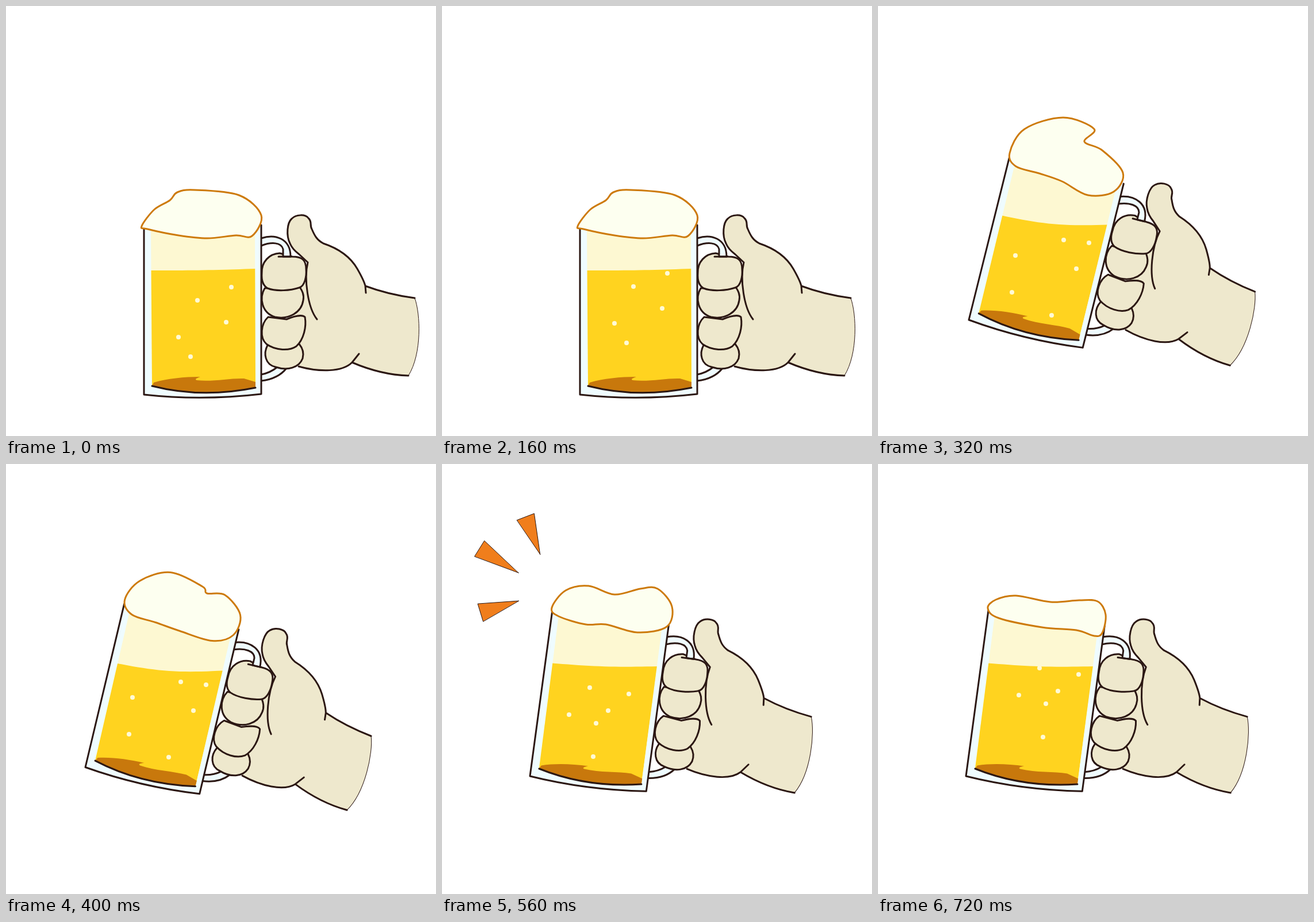
Animation, 748 px wide and 748 px high, one loop 800 ms. Source, as an HTML page with a canvas:

```html
<!DOCTYPE html>
<html lang="en">
<head>
<meta charset="utf-8">
<title>Cheers</title>
<style>
html, body { margin: 0; width: 100%; height: 100%; overflow: hidden; background: #fff; }
canvas { display: block; }
</style>
</head>
<body>
<canvas id="stage" width="748" height="748"></canvas>
<script>
const ctx = document.getElementById('stage').getContext('2d');
const STEP = 80;
const INK = '#2b1713', SKIN = '#eee8cd', GLASS = '#effcff', CREAM = '#fdf8d2', BEER = '#ffd31f',
      DREGS = '#c8780c', BUBBLE = '#fffad6', FOAM = '#fdfff0', RIM = '#cd7a0b', SPARK = '#f07e1c';

// Rigid parts, drawn in the resting pose.
const P = d => new Path2D(d);
const thumb = 'M525 446 L510 432 Q498 423 494 413 C487 399 489 377 497 370 C505 362 521 362 526 369 C533 375 528 382 532 388 C537 400 541 407 552 413 C582 423 600 438 611 457 Q623 478 625 487';
const wrist = 'Q665 502 711 508';
const cuff = 'C721 535 724 605 700 643';
const palm = 'C665 642 630 632 602 620 C585 637 545 637 509 627';
const hand = P(`${thumb} ${wrist} ${cuff} ${palm} L495 560 L508 470 Z`);
const handLines = P(`${thumb} L626 499 M625 487 ${wrist} M700 643 ${palm} M614 605 L602 620 M525 446 C518 475 525 525 541 545`);
const cuffLine = P('M711 508 ' + cuff);
const fingers = [
  'M455 590 C447 605 451 624 469 628 C490 635 510 629 516 613 C519 602 515 594 510 588 Z',
  'M456 541 C443 553 441 577 453 588 C470 600 493 600 505 592 C518 580 523 558 520 541 C515 536 500 540 488 545 Z',
  'M450 491 C440 508 445 534 468 541 C492 546 514 533 517 512 C519 502 515 495 511 489 Z',
  'M476 430 C458 431 444 445 445 465 C444 480 448 487 455 491 C470 497 495 495 510 490 C520 487 523 470 522 458 C522 442 515 436 498 436 Z'
].map(P);
const gripTop = P('M444 404 C468 396 495 404 495 436 L482 436 L482 423 C479 411 462 410 444 417');
const gripEnd = P('M474 436 L496 436');
const gripLow = P('M444 641 Q460 638 472 628 L488 630 C477 644 462 650 444 652');
const glass = P('M240 384 L240 676 Q340 687 444 675 L444 381');
const inside = P('M252 386 L433 386 L434 664 Q340 683 254 661 Z');
const dregs = P('M254 661 L257 655 C280 648 310 645 338 645 Q326 649 332 651 C360 654 390 647 414 648 L434 654 L434 664 Q340 683 254 661 Z');
const insideBase = P('M254 661 Q340 683 434 664');

// at: lower left corner of the glass and its turn in degrees.
// beer: surface height at the left wall and its dip in the middle.
// foam: key points of a smooth outline.
const pairs = s => s.split(' ').map(p => p.split(',').map(Number));
const pose = (at, beer, foam) => ({ at, beer, foam: pairs(foam) });
const mix = (a, b) => Array.isArray(a) ? a.map((v, i) => mix(v, b[i])) : (a + b) / 2;
const between = (a, b) => ({ at: mix(a.at, b.at), beer: mix(a.beer, b.beer), foam: mix(a.foam, b.foam) });

const rest = pose([240, 676, 0], [460, 1],
  '236,383 258,354 285,338 298,324 328,320 405,329 444,364 428,400 400,399 350,404 300,399 246,388');
const lift = pose([221, 653, 1.5], [467, 9],
  '227,352 259,320 272,308 300,306 344,320 397,308 424,323 431,365 414,383 386,378 300,381 243,373');
const swing = pose([158, 546, 14], [486, 7],
  '229,256 255,214 322,194 376,214 359,236 390,251 426,290 410,323 365,329 320,305 280,291 240,279');
const clink = pose([118, 509, 12.8], [489, 7],
  '184,217 210,193 250,183 307,212 340,214 372,205 389,235 381,272 352,286 285,276 240,260 198,245');
const back = pose([153, 543, 7.7], [476, 3],
  '191,250 215,220 255,212 300,227 345,217 375,217 400,248 391,283 340,293 285,279 250,279 203,265');
const still = pose([153, 543, 7.7], [476, 3],
  '191,251 205,236 240,229 300,240 350,237 382,239 396,262 390,294 376,299 345,289 285,284 210,268');
const steps = [rest, rest, rest, lift, swing, between(swing, clink), clink, back, between(back, still), still];

// Bubbles appear in three bursts, each drifting steadily from its first step.
const fizz = [
  { from: 0, drift: [0, -12], spots: pairs('392,489 333,512 383,550 300,576 321,610') },
  { from: 4, drift: [-19, -28], spots: pairs('323,407 239,434 345,457 233,498 302,538 367,412') },
  { from: 7, drift: [12, -17], spots: pairs('257,389 325,400 221,436 289,429 268,451 263,509') }
];

// Sparks shoot out along fixed rays: origin, angle, reach.
const rays = [[177, 174, -111, 88], [150, 200, -148, 100], [150, 233, 163, 87]];
const sparkSpan = { 6: [0, 0.28], 7: [0.2, 1], 8: [0.6, 1.24] };

function smooth(pts) {
  const path = new Path2D(), n = pts.length;
  path.moveTo(...pts[0]);
  pts.forEach((b, i) => {
    const a = pts[(i + n - 1) % n], c = pts[(i + 1) % n], d = pts[(i + 2) % n];
    path.bezierCurveTo(b[0] + (c[0] - a[0]) / 6, b[1] + (c[1] - a[1]) / 6,
                       c[0] - (d[0] - b[0]) / 6, c[1] - (d[1] - b[1]) / 6, c[0], c[1]);
  });
  path.closePath();
  return path;
}

function fill(path, color) {
  ctx.fillStyle = color;
  ctx.fill(path);
}

function line(path, color = INK, width = 3) {
  ctx.strokeStyle = color;
  ctx.lineWidth = width;
  ctx.stroke(path);
}

function drawBeer([left, dip]) {
  const path = new Path2D();
  path.moveTo(252, 690);
  for (let u = 0; u <= 1.001; u += 0.05) {
    path.lineTo(252 + 182 * u, left + (457 - left) * u + dip * Math.sin(Math.PI * u));
  }
  path.lineTo(434, 690);
  ctx.save();
  ctx.clip(inside);
  fill(path, BEER);
  ctx.restore();
}

function drawMug({ at: [x, y, deg], beer }) {
  ctx.save();
  ctx.translate(x, y);
  ctx.rotate(deg * Math.PI / 180);
  ctx.translate(-240, -676);
  fill(gripLow, GLASS);
  line(gripLow);
  fill(hand, SKIN);
  line(handLines);
  line(cuffLine, INK, 1);
  for (const f of fingers) {
    fill(f, SKIN);
    line(f);
  }
  fill(gripTop, GLASS);
  line(gripTop);
  line(gripEnd);
  fill(glass, GLASS);
  fill(inside, CREAM);
  drawBeer(beer);
  fill(dregs, DREGS);
  line(insideBase);
  line(glass);
  ctx.restore();
}

function drawBubbles(i) {
  const { from, drift, spots } = fizz.findLast(f => f.from <= i);
  for (const [x, y] of spots) {
    const dot = new Path2D();
    dot.arc(x + drift[0] * (i - from), y + drift[1] * (i - from), 4, 0, Math.PI * 2);
    fill(dot, BUBBLE);
  }
}

function drawSparks([inner, outer]) {
  for (const [x, y, deg, reach] of rays) {
    const c = Math.cos(deg * Math.PI / 180), s = Math.sin(deg * Math.PI / 180);
    const tri = new Path2D();
    for (const [r, side] of [[inner, 0], [outer, 16], [outer, -16]]) {
      tri.lineTo(x + c * r * reach - s * side, y + s * r * reach + c * side);
    }
    tri.closePath();
    fill(tri, SPARK);
    line(tri, INK, 1);
  }
}

function draw(i) {
  ctx.fillStyle = '#fff';
  ctx.fillRect(0, 0, 748, 748);
  ctx.lineJoin = ctx.lineCap = 'round';
  drawMug(steps[i]);
  drawBubbles(i);
  const foam = smooth(steps[i].foam);
  fill(foam, FOAM);
  line(foam, RIM);
  if (sparkSpan[i]) drawSparks(sparkSpan[i]);
}

const start = performance.now();
function tick() {
  draw(Math.floor((performance.now() - start) / STEP) % steps.length);
  requestAnimationFrame(tick);
}
tick();
</script>
</body>
</html>
```
